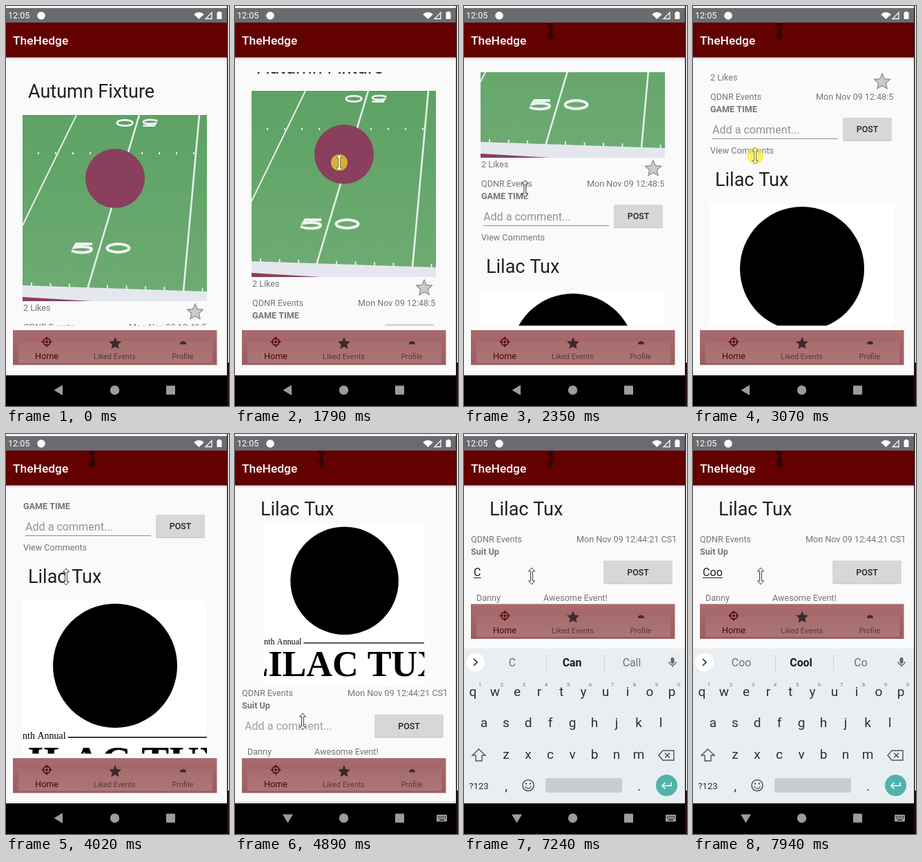
An HTML page with a canvas that plays this animation: 323 px wide and 580 px high, repeating every 8000 ms.

```html
<!DOCTYPE html>
<html lang="en">
<head>
<meta charset="utf-8">
<title>Event feed</title>
<style>
  html, body { margin: 0; width: 100%; height: 100%; overflow: hidden; background: #fafafa; }
  canvas { display: block; width: 323px; height: 580px; }
</style>
</head>
<body>
<canvas id="stage"></canvas>
<script>
const W = 323, H = 580, LOOP = 8000, BEAT = 79.55;
const canvas = document.getElementById('stage');
const ctx = canvas.getContext('2d');
const dpr = window.devicePixelRatio || 1;
canvas.width = W * dpr;
canvas.height = H * dpr;

const INK = '#212121', GREY = '#757575', MAROON = '#630000', KEY = '#2b3036', TOOL = '#5f666d';
const BODY = 12.6, TITLE = 27, FIELD = 16.1;
const ORG = 'QDNR Events', PARTY = 'Lilac Tux', HINT = 'Add a comment...';

const OPEN = 4100, LOADED = 4260, COMMENTS = 4490, KEYS_UP = 4810, RESIZED = 5130;
const TYPED = 'Coo', TYPING = [7240, 7400, 7940];

// Pointer moves: start, end, and the place reached
const glides = [
  { from: 450, to: 850, x: 253, y: 401 },
  { from: 1160, to: 1320, x: 165, y: 292 },
  { from: 1500, to: 1630, x: 153, y: 272 },
  { from: 1630, to: 1790, x: 151, y: 227 },
  { from: 1790, to: 2020, x: 125, y: 54 },
  { from: 2020, to: 2350, x: 88, y: 267 },
  { from: 2350, to: 2670, x: 96, y: 379 },
  { from: 2670, to: 2750, x: 95, y: 353 },
  { from: 2750, to: 3070, x: 90, y: 214 },
  { from: 3070, to: 3230, x: 88, y: 192 },
  { from: 3550, to: 3780, x: 87, y: 207 },
  { from: 4260, to: 4490, x: 98, y: 417 },
  { from: 5130, to: 5370, x: 98, y: 206 }
];
const SLOP = 10;
const drags = [{ from: 1630, to: 2020, fling: 0 }, { from: 2750, to: 3230, fling: 20 }];
const taps = [{ from: 3940, to: 4015 }, { from: 4730, to: 4810 }];

const clamp = k => Math.max(0, Math.min(1, k));
const easeOut = k => 1 - (1 - k) ** 2;

function pointerAt(t) {
  return glides.reduce((p, g) => {
    const k = clamp((t - g.from) / (g.to - g.from));
    return { x: p.x + (g.x - p.x) * k, y: p.y + (g.y - p.y) * k };
  }, { x: 259, y: 528 });
}

// The list follows the finger, then coasts
function scrollAt(t) {
  return drags.reduce((sum, d) => {
    if (t < d.from) return sum;
    const pull = pointerAt(d.from).y - SLOP - pointerAt(Math.min(t, d.to)).y;
    return sum + Math.max(0, pull) + d.fling * easeOut(clamp((t - d.to) / 160));
  }, 0);
}

function rect(x, y, w, h, fill) {
  ctx.fillStyle = fill;
  ctx.fillRect(x, y, w, h);
}

function round(x, y, w, h, r, fill) {
  ctx.beginPath();
  ctx.roundRect(x, y, w, h, r);
  ctx.fillStyle = fill;
  ctx.fill();
}

function disc(x, y, r, fill) {
  ctx.beginPath();
  ctx.arc(x, y, r, 0, Math.PI * 2);
  ctx.fillStyle = fill;
  ctx.fill();
}

function arc(x, y, r, color, width, from = 0, to = Math.PI * 2) {
  ctx.beginPath();
  ctx.arc(x, y, r, from, to);
  ctx.strokeStyle = color;
  ctx.lineWidth = width;
  ctx.stroke();
}

function trace(points, close) {
  ctx.beginPath();
  points.forEach(([x, y]) => ctx.lineTo(x, y));
  if (close) ctx.closePath();
}

function poly(points, fill) {
  trace(points, true);
  ctx.fillStyle = fill;
  ctx.fill();
}

function line(points, color, width, close) {
  trace(points, close);
  ctx.strokeStyle = color;
  ctx.lineWidth = width;
  ctx.stroke();
}

function fade(y0, y1, top, bottom) {
  const g = ctx.createLinearGradient(0, y0, 0, y1);
  g.addColorStop(0, top);
  g.addColorStop(1, bottom);
  return g;
}

// y is the middle of the capitals
function text(str, x, y, size, color, weight = 400, align = 'left', family = 'Roboto, sans-serif') {
  ctx.font = `${weight} ${size}px ${family}`;
  ctx.textAlign = align;
  ctx.fillStyle = color;
  ctx.fillText(str, x, y + size * 0.355);
}

const label = (str, x, y, weight) => text(str, x, y, BODY, GREY, weight);

function clipped(x, y, w, h, draw) {
  ctx.save();
  ctx.beginPath();
  ctx.rect(x, y, w, h);
  ctx.clip();
  draw();
  ctx.restore();
}

function at(x, y, scale, turn, draw) {
  ctx.save();
  ctx.translate(x, y);
  ctx.rotate(turn);
  ctx.scale(scale, scale);
  draw();
  ctx.restore();
}

function starPoints(x, y, r) {
  return Array.from({ length: 10 }, (_, i) => {
    const a = -Math.PI / 2 + i * Math.PI / 5, d = i % 2 ? r * 0.47 : r;
    return [x + Math.cos(a) * d, y + Math.sin(a) * d];
  });
}

// Yard number as seen flat on the grass
function fifty() {
  ctx.strokeStyle = '#eef3f1';
  ctx.lineWidth = 4;
  ctx.beginPath();
  ctx.ellipse(25.5, 0, 16, 6, 0, 0, Math.PI * 2);
  ctx.stroke();
  ctx.beginPath();
  ctx.moveTo(-12, -6);
  ctx.lineTo(-35, -6);
  ctx.lineTo(-38, -1);
  ctx.bezierCurveTo(-27, -3, -13, -2, -13, 2);
  ctx.bezierCurveTo(-13, 7, -32, 8, -42, 4);
  ctx.stroke();
}

// Field photo
function field() {
  clipped(0, 0, 267, 270, () => {
    const white = '#e6efec';
    rect(0, 0, 267, 270, fade(0, 270, '#5ea264', '#6dab72'));
    line([[78, 0], [0, 160]], white, 2);
    line([[169, 0], [94, 252]], white, 2.6);
    line([[256, 0], [233, 256]], white, 2.6);
    for (let i = 0; i < 10; i++) {
      rect(22 + i * 25, 54, 2, 3, white);
      rect(12 + i * 27.5, 243 + i * 0.9, 2, 6, white);
    }
    disc(134, 92, 43, '#8a3f5d');
    at(166, 11.5, 0.7, Math.PI, fifty);
    at(113, 193, 1, 0, fifty);
    poly([[0, 247], [267, 256], [267, 270], [0, 270]], '#e4e7ee');
    poly([[0, 264], [100, 270], [0, 270]], '#8a3f5d');
  });
}

// Invitation flyer
function flyer() {
  const serif = '"Liberation Serif", serif';
  clipped(0, 0, 267, 270, () => {
    rect(0, 0, 267, 270, '#fff');
    disc(134, 94, 90, '#000');
    text('nth Annual', 0, 195, 14, '#000', 400, 'left', serif);
    rect(66, 197, 201, 1.5, '#000');
    text('LILAC TUX', 133, 231, 60, '#000', 700, 'center', serif);
  });
}

function postButton(x, y, w) {
  round(x, y + 1, w, 33, 2, '#c4c4c4');
  round(x, y, w, 33, 2, '#d6d8d7');
  text('POST', x + w / 2, y + 17, 12.4, INK, 500, 'center');
}

function feed(scroll) {
  clipped(24, 96, 267, 367.5, () => {
    ctx.translate(0, -Math.round(scroll));
    text('Autumn Fixture', 32, 123, TITLE, INK);
    at(24, 158, 1, 0, field);
    label('2 Likes', 25, 437.5);
    const star = starPoints(274, 444, 12);
    poly(star, '#cbcbcb');
    line(star, '#8f8f8f', 1.3, true);
    label(ORG, 25, 466);
    label('Mon Nov 09 12:48:5', 178, 466);
    label('GAME TIME', 25, 483.7, 700);
    text(HINT, 28, 513.5, FIELD, '#929292');
    rect(28, 526, 182, 1, '#8a8a8a');
    postButton(217, 496, 71);
    label('View Comments', 25, 543.5);
    text(PARTY, 32, 585, TITLE, INK);
    at(24, 621, 1, 0, flyer);
  });
}

function eventPage(t) {
  const typed = TYPED.slice(0, TYPING.filter(s => s <= t).length);
  const dy = t < RESIZED ? 223 : 0;
  clipped(0, 76, 306, 394, () => {
    if (t >= LOADED) {
      text(PARTY, 37, 108.5, TITLE, INK);
      if (dy) at(42, 131, 0.87, 0, flyer);
      label(ORG, 10, 153 + dy);
      label('Mon Nov 09 12:44:21 CST', 163, 153 + dy);
      label('Suit Up', 10, 170.5 + dy, 700);
    }
    text(typed || HINT, 14, 200.5 + dy, FIELD, typed ? INK : '#a0a0a0');
    if (typed) rect(14, 208, ctx.measureText(typed).width, 1, INK);
    rect(13, 214 + dy, 183, 1, '#fff');
    postButton(202, 183.5 + dy, 100);
    if (t >= COMMENTS) {
      label('Danny', 18, 238 + dy);
      label('Awesome Event!', 115, 238 + dy);
    }
  });
}

function tabs(y) {
  const red = '#5c0d12', dark = '#3a2a2d';
  rect(10, y, 295.5, 50.5, fade(y, y + 50, '#a96b6d', '#9b5d60'));
  rect(18, y + 16, 281, 31.5, fade(y + 16, y + 47, '#a66d6f', '#ad7577'));

  arc(59, y + 17, 5, red, 1.8);
  disc(59, y + 17, 2, red);
  for (let i = 0; i < 4; i++)
    at(59, y + 17, 1, i * Math.PI / 2, () => rect(3, -0.8, 4.5, 1.6, red));
  poly(starPoints(158, y + 19.5, 9.5), dark);
  ctx.beginPath();
  ctx.arc(256.5, y + 20.5, 4.6, Math.PI, 0);
  ctx.fill();

  text('Home', 59, y + 38, BODY, '#4a0408', 400, 'center');
  text('Liked Events', 157.5, y + 38.5, 10.9, '#57383b', 400, 'center');
  text('Profile', 256, y + 38.5, 10.9, '#57383b', 400, 'center');
}

function suggestions(t, y) {
  const words = t < 7480 ? ['C', 'Can', 'Call'] : t < TYPING[2] ? ['Co', 'Come', 'Could'] : ['Coo', 'Cool', 'Co'];
  words.forEach((word, i) => {
    const main = i === 1;
    text(word, 70 + i * 86.5, y + 0.5, 15.8, main ? '#16191c' : '#6a7178', main ? 700 : 400, 'center');
    if (i) rect(35 + i * 84, y - 11, 1, 23, '#ccd1d5');
  });
}

function shortcuts(y) {
  arc(57.5, y - 1.5, 4.6, TOOL, 1.7);
  line([[61, y + 2], [66, y + 7]], TOOL, 1.9);
  ctx.beginPath();
  ctx.roundRect(98.5, y - 7, 13, 13, 3);
  ctx.stroke();
  face(105, y, 0.6, TOOL);
  text('GIF', 151, y, 11.5, TOOL, 900, 'center');
  rect(192, y - 7, 14, 14, TOOL);
  rect(228, y - 11, 1, 23, '#ccd1d5');
  for (let i = -1; i < 2; i++) disc(257 + i * 6, y, 1.7, TOOL);
}

function face(x, y, size, color) {
  disc(x - 3 * size, y - 2.5 * size, 1.2, color);
  disc(x + 3 * size, y - 2.5 * size, 1.2, color);
  arc(x, y, 4.6 * size, color, 1.4, 0.3, Math.PI - 0.3);
}

function toolbar(t) {
  const y = 331, open = t >= TYPING[0], d = open ? 2.5 : -2.5;
  disc(16.5, y, 13.5, '#fff');
  line([[16.5 - d, y - 5], [16.5 + d, y], [16.5 - d, y + 5]], KEY, 1.7);
  round(299.5, y - 7, 5, 9, 2.5, TOOL);
  arc(302, y - 1, 5, TOOL, 1.4, 0, Math.PI);
  rect(301.3, y + 4, 1.4, 3, TOOL);
  if (open) suggestions(t, y);
  else shortcuts(y);
}

function keyboard(t, drop) {
  const gray = '#4c5359';
  const key = (k, x, y, size = 19) => text(k, x, y, size, KEY, 400, 'center');
  clipped(0, 300, 320, 236, () => {
    ctx.translate(0, drop);
    rect(0, 311, 320, 225, '#e9eef2');
    toolbar(t);
    ['qwertyuiop', 'asdfghjkl', 'zxcvbnm'].forEach((row, r) =>
      [...row].forEach((k, i) => key(k, [13, 29, 61][r] + i * 32, 373 + r * 45.5)));
    for (let i = 0; i < 10; i++) text((i + 1) % 10, 23 + i * 32, 363, 8, '#70777e', 400, 'center');

    // shift and backspace
    line([[21.5, 457], [31, 466], [26, 466], [26, 474], [17, 474], [17, 466], [12, 466]], gray, 1.4, true);
    line([[282, 466], [288, 459], [304, 459], [304, 473], [288, 473]], gray, 1.4, true);
    line([[291, 462.5], [298, 469.5]], gray, 1.4);
    line([[298, 462.5], [291, 469.5]], gray, 1.4);

    key('?123', 21.5, 510, 13.2);
    key(',', 61, 510);
    key('.', 253.5, 510);
    arc(93, 509.5, 8, gray, 1.5);
    face(93, 509.5, 1, gray);
    round(118, 499, 111, 21, 3, '#c9cdd1');
    disc(293.5, 509.5, 15.5, '#4fb3aa');
    line([[300, 505], [300, 510], [287, 510]], '#fff', 1.7);
    line([[291.5, 505.5], [287, 510], [291.5, 514.5]], '#fff', 1.7);
  });
}

function topBars(t) {
  rect(0, 0, 320, 3, '#f4f4f4');
  rect(0, 3, 320, 21, '#6a6b70');
  text('12:05', 3, 14, BODY, '#fff');
  disc(51, 14, 5.8, '#fff');
  ctx.beginPath();
  ctx.moveTo(279.5, 19);
  ctx.arc(279.5, 19, 10, -Math.PI * 0.76, -Math.PI * 0.24);
  ctx.fill();
  line([[298, 9.5], [298, 18.5], [289, 18.5]], '#fff', 1.3, true);
  round(305.5, 9, 7, 10, 1, '#fff');
  rect(307.5, 7.8, 3, 2, '#fff');

  rect(0, 74, 320, 4, fade(74, 78, 'rgba(0,0,0,.18)', 'rgba(0,0,0,0)'));
  rect(0, 24, 320, 50.5, MAROON);
  text('TheHedge', 10, 50, 17.4, '#fff', 500);
  if (t >= glides[4].to) smudge('#300406');
}

// Trail left on the title bar by the pointer
function smudge(dark) {
  rect(121, 25, 8, 5, dark);
  rect(123.5, 30, 4, 10, dark);
  disc(125.3, 43, 4.3, dark);
  poly([[121.5, 45], [129, 45], [125.3, 50]], dark);
}

function bottomBar(t) {
  const nav = '#9c9c9c', keys = t >= KEYS_UP;
  rect(0, 535.5, 323, 44.5, '#000');
  at(76.5, 557, 1, keys ? -Math.PI / 2 : 0, () => poly([[5.5, -7.5], [5.5, 7.5], [-7, 0]], nav));
  disc(157.5, 557, 6.7, nav);
  round(232, 550.5, 13, 13, 1, nav);
  if (keys) {
    round(292, 552, 15, 10, 1, nav);
    for (let i = 0; i < 10; i++) rect(294 + (i % 5) * 2.5, 554 + (i > 4) * 2.5, 1.2, 1.2, '#000');
    rect(296, 559.2, 7, 1.2, '#000');
  }
  rect(320, 0, 3, H, '#230c0f');
  rect(321.5, 0, 1.5, 517, '#fff');
}

function drawPointer(t, now) {
  if (now < 450 || (now >= LOADED && now < COMMENTS)) return;
  const { x, y } = pointerAt(t);
  const held = [...drags, ...taps].some(p => now >= p.from && now < p.to);
  if (held) disc(x, y, 12, 'rgba(250,238,40,.66)');
  const side = [[0, -12], [4.5, -7], [1.4, -7], [1.4, 7], [4.5, 7], [0, 12]];
  const mirror = side.map(([a, b]) => [-a, b]).reverse();
  at(x, y, 1, 0, () => {
    poly([...side, ...mirror], '#fff');
    line([...side, ...mirror], held ? '#6b6420' : '#222', 0.9, true);
  });
}

function render(now) {
  const t = 1790 + Math.floor((now - 1790) / BEAT + 0.01) * BEAT;
  ctx.setTransform(dpr, 0, 0, dpr, 0, 0);
  rect(0, 0, W, H, '#fafafa');
  if (now < OPEN) feed(scrollAt(t));
  else eventPage(now);
  tabs(now < RESIZED ? 470 : 246.5);
  if (now >= KEYS_UP) keyboard(now, 225 * (1 - easeOut(clamp((t - KEYS_UP) / 320))));
  topBars(now);
  bottomBar(now);
  drawPointer(t, now);
}

const start = performance.now();
function frame() {
  render((performance.now() - start) % LOOP);
  requestAnimationFrame(frame);
}
frame();
</script>
</body>
</html>
```
